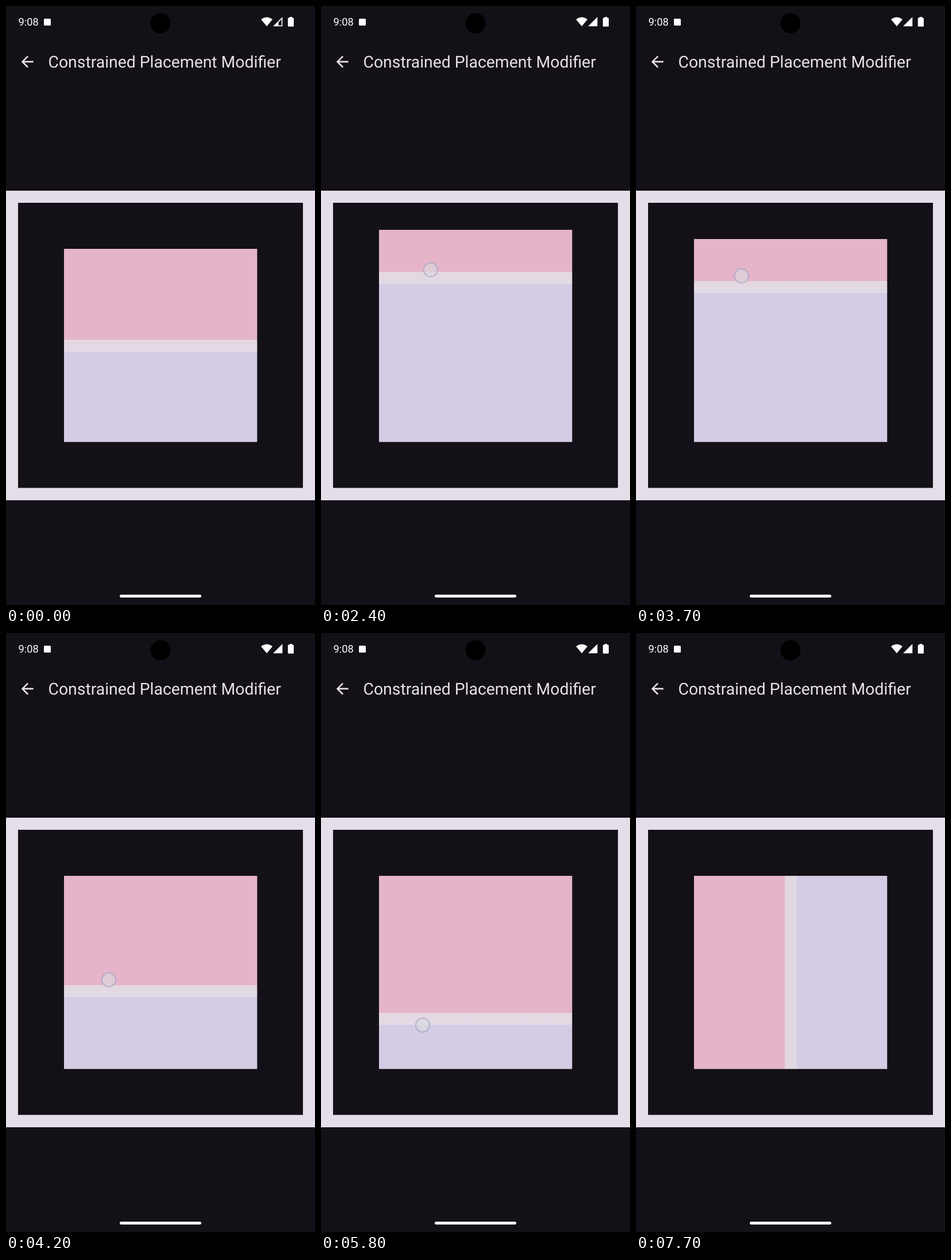
Write an HTML page that moves like this. It is 538x1041 px and loops after 8 s.

```html
<!DOCTYPE html>
<html lang="en">
<head>
<meta charset="utf-8">
<title>Draggable split panes</title>
<style>
  html, body { margin: 0; width: 100%; height: 100%; overflow: hidden; background: #131117; }
  svg { display: block; width: 538px; height: 1041px; }
  text { font-family: Roboto, sans-serif; fill: #e7e1e8; text-rendering: geometricPrecision; }
  .icon { fill: #fff; }
  .pink { fill: #e5b4c8; }
  .lilac { fill: #d4cbe4; }
</style>
</head>
<body>
<svg viewBox="0 0 538 1041">
  <defs>
    <linearGradient id="down" x2="0" y2="1">
      <stop stop-color="#e5d7de"/><stop offset="1" stop-color="#e2dae7"/>
    </linearGradient>
    <linearGradient id="across">
      <stop stop-color="#e5d5da"/><stop offset="1" stop-color="#e2dae7"/>
    </linearGradient>
  </defs>
  <rect width="538" height="1041" fill="#131117"/>

  <!-- status bar -->
  <text class="icon" x="21.5" y="34.3" font-size="18.3">9:08</text>
  <rect class="icon" x="66" y="22" width="12" height="12" rx="1.5"/>
  <circle cx="269" cy="30" r="17.5"/>
  <path class="icon" d="M444 23.3Q454 15.5 464 23.3L454 35.3Z"/>
  <path class="icon" d="M481.3 19V35.3H465Z"/>
  <path id="weak" fill="#131117" d="M479.7 23L474.5 28.2V33.7H479.7Z"/>
  <rect class="icon" x="490.8" y="20.5" width="10.2" height="15.3" rx="1.4"/>
  <rect class="icon" x="493.5" y="19" width="4.8" height="3"/>

  <!-- app bar -->
  <path transform="translate(21.5 81.2) scale(1.309)" fill="#e7e1e8"
    d="M7.825 13L13.425 18.6 12 20 4 12 12 4 13.425 5.4 7.825 11H20V13Z"/>
  <text x="73.5" y="106.8" font-size="28.35">Constrained Placement Modifier</text>

  <!-- frame -->
  <rect y="321" width="538" height="538" fill="#e5dde8"/>
  <rect x="21" y="342" width="496" height="495.5" fill="#131117"/>

  <g id="stacked">
    <rect id="top" class="pink" x="101" width="336.3"/>
    <rect id="bar" x="101" width="336.3" height="21" fill="url(#down)"/>
    <rect id="bottom" class="lilac" x="101" width="336.3"/>
    <g id="dim">
      <rect x="101" y="422" width="336.3" height="151" fill="#5d595d"/>
      <rect x="101" y="573" width="336.3" height="184.7" fill="#575361"/>
    </g>
  </g>
  <g id="columns">
    <rect class="pink" x="101" y="422" width="158" height="335.7"/>
    <rect x="259" y="422" width="21" height="335.7" fill="url(#across)"/>
    <rect class="lilac" x="280" y="422" width="157.3" height="335.7"/>
  </g>

  <g id="touch">
    <circle r="12" fill="#dadadd" fill-opacity=".6"/>
    <circle r="12" fill="none" stroke="#a0a3c4" stroke-opacity=".7" stroke-width="2"/>
  </g>

  <rect x="198" y="1023" width="142" height="5" rx="2.5" fill="#fff"/>
</svg>
<script>
const LOOP = 8000, STEP = 100;
const HOME_TOP = 422, HOME_BOTTOM = 757.7, BAR = 21, MIN_PANE = 73;
const REST = 580, SPLIT_MIN = 416, SPLIT_MAX = 743;

// Finger strokes; grip is the divider's distance from the finger.
const strokes = [
  { begin: 900, end: 3150, from: [203, 591], to: [186, 406], grip: 4, limit: REST },
  { begin: 3300, end: 4980, from: [186, 406], to: [173, 765], grip: 9, limit: SPLIT_MAX },
  { begin: 5300, end: 6400, from: [173, 765], to: [182, 575], grip: -22, limit: SPLIT_MAX }
];

const el = id => document.getElementById(id);
const set = (id, name, value) => el(id).setAttribute(name, value);
const show = (id, on) => set(id, "visibility", on ? "visible" : "hidden");
const clamp = (v, lo = 0, hi = 1) => Math.max(lo, Math.min(hi, v));
const ramp = (t, begin, end) => clamp((t - begin) / (end - begin));
const ease = p => 0.4 * p + 0.3 * (1 - Math.cos(Math.PI * p));

function span(id, y, end) {
  set(id, "y", y);
  set(id, "height", end - y);
}

function draw(t) {
  const s = strokes.findLast(k => t >= k.begin) || strokes[0];
  const p = ease(ramp(t, s.begin, s.end));
  let [x, y] = s.from.map((v, i) => v + (s.to[i] - v) * p);
  const split = Math.round(clamp(y + s.grip, SPLIT_MIN, s.limit));

  // a pane at its smallest size is pushed along by the divider
  span("top", Math.min(HOME_TOP, split - MIN_PANE), split);
  set("bar", "y", split);
  span("bottom", split + BAR, Math.max(HOME_BOTTOM, split + BAR + MIN_PANE));

  // the tap swaps rows for columns
  const tap = t >= 6800 && t < 7100;
  if (tap) [x, y] = [236, 531];
  set("dim", "opacity", ramp(t, 6800, 7000));
  set("columns", "opacity", 0.35 + 0.65 * ramp(t, 7000, 7300));
  show("stacked", t <= 7000);
  show("columns", t > 7000);

  show("touch", tap || (t >= 1000 && t < 6600));
  set("touch", "transform", `translate(${x} ${y})`);
  show("weak", t < 1000);
}

const start = performance.now();
function tick() {
  const t = (performance.now() - start) % LOOP;
  draw(Math.floor(t / STEP) * STEP);
  requestAnimationFrame(tick);
}
tick();
</script>
</body>
</html>
```
